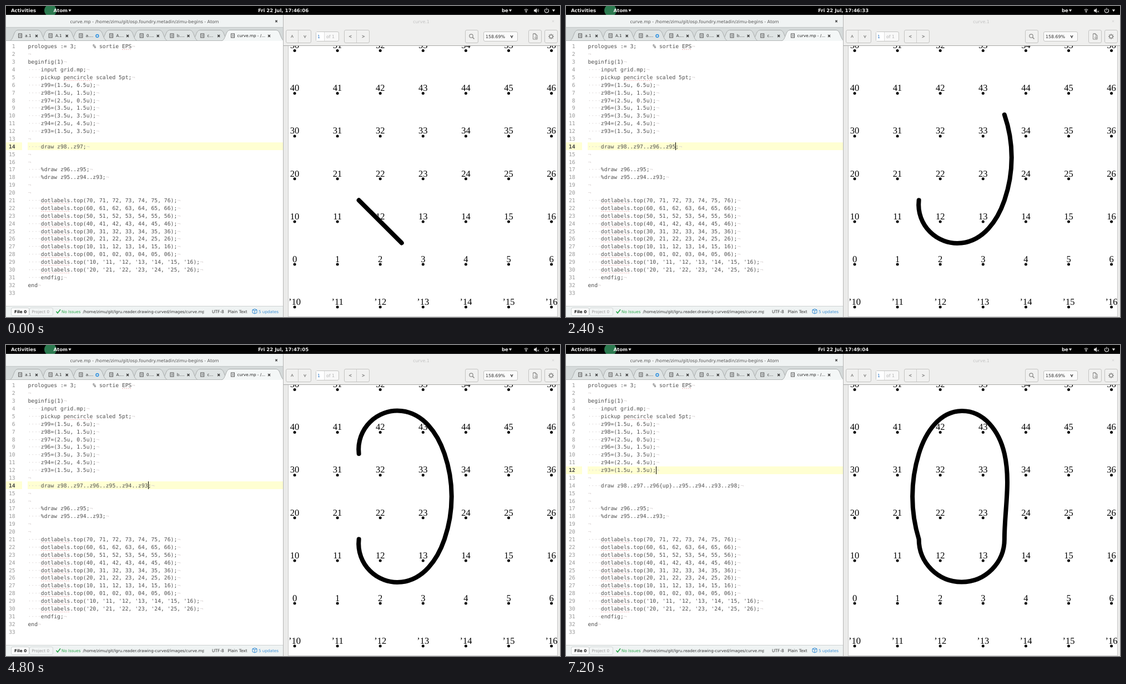
An HTML page with a canvas for the animation above (8 s loop, 998x561 px).

```html
<!DOCTYPE html>
<html lang="en">
<head>
<meta charset="utf-8">
<title>Curve editing</title>
<style>
  html, body { margin: 0; width: 100%; height: 100%; overflow: hidden; background: #fff; }
  canvas { display: block; width: 998px; height: 561px; }
</style>
</head>
<body>
<canvas id="stage" width="998" height="561"></canvas>
<script>
const ctx = document.getElementById('stage').getContext('2d');
ctx.textRendering = 'geometricPrecision';

const LOOP = 8000, STEP = 1200;
const SANS = '"DejaVu Sans", sans-serif', MONO = '"DejaVu Sans Mono", monospace';
const CODE_X = 39.5, CHAR = 5.848, LINE = 13.88, CODE_SIZE = 9.713;
const UNIT = 77.1, ORIGIN = [520, 466];
const UP = Math.PI / 2;

const POINTS = {
  98: [1.5, 1.5], 97: [2.5, 0.5], 96: [3.5, 1.5],
  95: [3.5, 3.5], 94: [2.5, 4.5], 93: [1.5, 3.5]
};
const ROUTE = [98, 97, 96, 95, 94, 93, 98];
const CLOCK = ['46:06', '46:19', '46:33', '46:46', '47:05', '47:12', '49:04'];

// ---------- drawing helpers ----------
function rect(x, y, w, h, fill) {
  ctx.fillStyle = fill;
  ctx.fillRect(x, y, w, h);
}

function text(str, x, y, { size = 7.9, color = '#333', family = SANS, weight = '', align = 'left' } = {}) {
  ctx.font = `${weight} ${size}px ${family}`;
  ctx.fillStyle = color;
  ctx.textAlign = align;
  ctx.fillText(str, x, y);
}

function line(points, color, width = 1) {
  ctx.beginPath();
  points.forEach(([x, y]) => ctx.lineTo(x, y));
  ctx.strokeStyle = color;
  ctx.lineWidth = width;
  ctx.stroke();
}

function disc(x, y, r, color) {
  ctx.beginPath();
  ctx.arc(x, y, r, 0, 7);
  ctx.fillStyle = color;
  ctx.fill();
}

function arc(x, y, r, from, to, color, width = 1) {
  ctx.beginPath();
  ctx.arc(x, y, r, from, to);
  ctx.strokeStyle = color;
  ctx.lineWidth = width;
  ctx.stroke();
}

function button(x, y, w, h, fill = '#f1f1f0', edge = '#c4c4c2') {
  ctx.beginPath();
  ctx.roundRect(x + .5, y + .5, w - 1, h - 1, 2.5);
  ctx.fillStyle = fill;
  ctx.fill();
  ctx.strokeStyle = edge;
  ctx.lineWidth = 1;
  ctx.stroke();
}

function cross(x, y, r, color, width = 1.3) {
  line([[x - r, y - r], [x + r, y + r]], color, width);
  line([[x + r, y - r], [x - r, y + r]], color, width);
}

function chevron(x, y, dx, dy, color, width = 1.2) {
  line([[x - dx - dy, y - dy - dx], [x + dx, y + dy], [x - dx + dy, y - dy + dx]], color, width);
}

function triangle(x, y, color) {
  ctx.beginPath();
  ctx.moveTo(x - 2.7, y - 1.8);
  ctx.lineTo(x + 2.7, y - 1.8);
  ctx.lineTo(x, y + 2.4);
  ctx.fillStyle = color;
  ctx.fill();
}

function clipped(x, y, w, h, draw) {
  ctx.save();
  ctx.beginPath();
  ctx.rect(x, y, w, h);
  ctx.clip();
  draw();
  ctx.restore();
}

// ---------- Hobby splines, as drawn by MetaPost ----------
function velocity(a, b) {
  const { sin, cos, sqrt } = Math;
  const top = 2 + Math.SQRT2 * (sin(a) - sin(b) / 16) * (sin(b) - sin(a) / 16) * (cos(a) - cos(b));
  return top / (3 + 1.5 * (sqrt(5) - 1) * cos(a) + 1.5 * (3 - sqrt(5)) * cos(b));
}

function hobby(pts, startDir, endDir) {
  const n = pts.length - 1;
  const dist = [], chord = [], turn = Array(n + 1).fill(0), theta = Array(n + 1).fill(0);
  for (let k = 0; k < n; k++) {
    const dx = pts[k + 1][0] - pts[k][0], dy = pts[k + 1][1] - pts[k][1];
    dist[k] = Math.hypot(dx, dy);
    chord[k] = Math.atan2(dy, dx);
    if (k) {
      const d = chord[k] - chord[k - 1];
      turn[k] = Math.atan2(Math.sin(d), Math.cos(d));
    }
  }
  for (let pass = 0; pass < 80; pass++) {
    theta[0] = startDir === undefined ? -theta[1] - turn[1] : startDir - chord[0];
    for (let k = 1; k < n; k++) {
      const a = 1 / dist[k - 1], d = 1 / dist[k];
      theta[k] = -(2 * a * turn[k] + d * turn[k + 1] + a * theta[k - 1] + d * theta[k + 1]) / (2 * (a + d));
    }
    theta[n] = endDir === undefined ? -theta[n - 1] : endDir - chord[n - 1];
  }
  return dist.map((d, k) => {
    const t = theta[k], f = -turn[k + 1] - theta[k + 1];
    const r = d * velocity(t, f), s = d * velocity(f, t);
    const [x0, y0] = pts[k], [x1, y1] = pts[k + 1];
    return [
      [x0, y0],
      [x0 + r * Math.cos(chord[k] + t), y0 + r * Math.sin(chord[k] + t)],
      [x1 - s * Math.cos(chord[k] - f), y1 - s * Math.sin(chord[k] - f)],
      [x1, y1]
    ];
  });
}

const toStage = ([x, y]) => [ORIGIN[0] + x * UNIT, ORIGIN[1] - y * UNIT];

function curveFor(step) {
  const pts = ROUTE.map(id => POINTS[id]);
  return step < 6
    ? hobby(pts.slice(0, step + 2))
    : [...hobby(pts.slice(0, 3), undefined, UP), ...hobby(pts.slice(2), UP)];
}
const CURVES = CLOCK.map((_, step) => curveFor(step));

// ---------- source text ----------
function drawCommand(step) {
  const names = ROUTE.slice(0, step + 2).map(id => 'z' + id);
  if (step === 6) {
    names.length = ROUTE.length;
    names[2] += '{up}';
  }
  return `    draw ${names.join('..')};`;
}

function codeLines(step) {
  const labels = ['7', '6', '5', '4', '3', '2', '1', '0', "'1", "'2"].map(row =>
    `    dotlabels.top(${[0, 1, 2, 3, 4, 5, 6].map(c => row + c).join(', ')});`);
  const coords = ['6.5', '1.5', '0.5', '1.5', '3.5', '4.5', '3.5'];
  const xs = ['1.5', '1.5', '2.5', '3.5', '3.5', '2.5', '1.5'];
  return [
    'prologues := 3;     % sortie EPS', '', 'beginfig(1)',
    '    input grid.mp;', '    pickup pencircle scaled 5pt;',
    ...xs.map((x, i) => `    z${99 - i}=(${x}u, ${coords[i]}u);`),
    '', drawCommand(step), '', '',
    '    %draw z96..z95;', '    %draw z95..z94..z93;', '', '',
    ...labels, '    endfig;', 'end', ''
  ];
}

// ---------- scene parts ----------
function topBar(step) {
  const bold = { size: 8.55, color: '#eee', weight: 'bold' };
  rect(0, 0, 998, 16, '#000');
  text('Activities', 9, 11, bold);
  clipped(0, 0, 200, 16, () => disc(80, 8, 11, '#2c7a50'));
  text('Atom', 85.5, 11, bold);
  triangle(115, 8, '#ddd');
  text(`Fri 22 Jul, 17:${CLOCK[step]}`, 499.5, 11, { ...bold, align: 'center' });
  text('be', 893, 11, bold);
  triangle(908.5, 8, '#ddd');

  for (const r of [2.2, 4.4]) arc(937, 11, r + .6, -2.3, -.85, '#bbb', 1.2);
  disc(937, 10.6, 1.1, '#eee');
  ctx.beginPath();
  [[951, 6.5], [953, 6.5], [956, 4], [956, 12.5], [953, 10], [951, 10]].forEach(p => ctx.lineTo(...p));
  ctx.fillStyle = '#ddd';
  ctx.fill();
  if (step === 0) for (const r of [2, 4]) arc(955.5, 8.2, r, -.9, .9, '#ccc');
  else cross(958.5, 10, 1.5, '#ddd', 1);
  arc(974, 8.5, 3.6, -1, 4.14, '#ddd', 1.2);
  line([[974, 3.5], [974, 8]], '#ddd', 1.2);
  triangle(986.5, 8, '#ddd');
}

function fileIcon(x, y) {
  ctx.strokeStyle = '#555';
  ctx.lineWidth = 1;
  ctx.strokeRect(x + .5, y + .5, 6, 7);
  for (const dy of [2.5, 4, 5.5]) line([[x + 2, y + dy], [x + 5.5, y + dy]], '#777', .7);
}

function tab(x, w, fill) {
  ctx.beginPath();
  ctx.moveTo(x - 6, 63);
  ctx.bezierCurveTo(x + 2, 62, x + 1, 44, x + 9, 43.5);
  ctx.lineTo(x + w - 9, 43.5);
  ctx.bezierCurveTo(x + w - 1, 44, x + w - 2, 62, x + w + 6, 63);
  ctx.fillStyle = fill;
  ctx.fill();
  ctx.strokeStyle = '#a9adad';
  ctx.lineWidth = 1;
  ctx.stroke();
}

function editorChrome() {
  rect(0, 16, 499, 23, '#f0f3f3');
  text('curve.mp - /home/zimu/git/osp.foundry.metadin/zimu-begins - Atom', 249.5, 31,
    { color: '#555', align: 'center' });
  cross(487, 27.5, 1.7, '#444');
  rect(0, 38, 499, 25, '#d5dada');
  rect(0, 38, 499, 1, '#c3c8c8');

  const tabs = ['a.1', 'A.1', 'a....', 'A....', '0....', 'b....', 'c...'];
  for (let i = tabs.length - 1; i >= 0; i--) {
    const x = 12 + i * 54.7;
    tab(x, 55, '#dfe4e4');
    fileIcon(x + 10, 49.5);
    text(tabs[i], x + 22.3, 56.3, { size: 7.2 });
    if (i === 2) arc(x + 43, 54, 2.4, 0, 7, '#2a8fe0', 1.5);
    else cross(x + 43, 54, 2, '#333');
  }
  rect(0, 62, 499, 1, '#b4b8b8');
  tab(394, 102, '#f4f7f7');
  fileIcon(405, 49.5);
  text('curve.mp - /...', 416.5, 56.3, { size: 7.2, color: '#222' });
  cross(474, 54, 2, '#333');
}

function spelling(row, col, length) {
  const y = Math.round(76.4 + row * LINE) + 2.5, x = CODE_X + col * CHAR;
  ctx.setLineDash([2, 1.5]);
  line([[x, y], [x + length * CHAR, y]], '#f2b5b5');
  ctx.setLineDash([]);
}

function editor(step) {
  const active = step === 6 ? 11 : 13;
  const lines = codeLines(step);
  const code = { size: CODE_SIZE, family: MONO, color: '#505050' };
  const faint = { ...code, color: '#d9d3d3' };
  rect(0, 63, 499, 478, '#fff');
  const bandY = Math.round(66 + active * LINE);
  rect(0, bandY, 29, 14, '#ffffd2');
  rect(39, bandY, 460, 14, '#ffffd2');

  lines.forEach((str, row) => {
    const y = 76.4 + row * LINE, on = row === active;
    text(row + 1, 16.7, y, { ...code, align: 'right', color: on ? '#444' : '#999', weight: on ? 'bold' : '' });
    text(str, CODE_X, y, code);
    if (str.startsWith(' ')) text('····', CODE_X, y, faint);
    if (row < lines.length - 1) text('¬', CODE_X + str.length * CHAR, y, faint);
    if (str.includes('dotlabels')) spelling(row, 4, 9);
  });
  spelling(0, 29, 3);
  spelling(4, 11, 9);

  if (step > 1) {
    const col = lines[active].length - (step === 6 ? 0 : 1);
    rect(Math.round(CODE_X + col * CHAR), bandY, 1, 14, '#000');
  }
}

function statusBar() {
  const small = { size: 7.2, color: '#333' };
  const y = 553.5;
  rect(0, 541, 499, 20, '#eff3f3');
  rect(0, 541, 499, 1, '#cfd3d3');
  button(9, 544, 33, 15, '#fbfcfc', '#cfd3d3');
  button(42, 544, 43, 15, '#f2f5f5', '#d5d9d9');
  text('File 0', 15, y, { ...small, color: '#111', weight: 'bold' });
  text('Project 0', 46.5, y, { ...small, color: '#999' });
  line([[90.5, 551], [93, 554], [98, 547.5]], '#2aa84a', 1.7);
  text('No Issues', 100, y, { ...small, color: '#2aa84a' });
  clipped(138, 541, 219, 20, () =>
    text('/home/zimu/git/lgru.reader.drawing-curved/images/curve.mp', 138.5, y, small));
  text('UTF-8', 371, y, { ...small, size: 7.5 });
  text('Plain Text', 399.5, y, { ...small, size: 7.4 });
  const blue = '#3b8fd6';
  line([[444, 548], [448, 546.5], [452, 548], [452, 553.5], [448, 555], [444, 553.5], [444, 548], [448, 549.5], [452, 548]], blue);
  line([[448, 549.5], [448, 555]], blue);
  text('5 updates', 455, y, { ...small, color: blue });
}

function viewerChrome() {
  rect(499, 16, 499, 56, '#efefee');
  rect(499, 16, 1, 545, '#b5b5b5');
  text('curve.1', 748, 31, { color: '#c2c2c2', align: 'center' });
  cross(985.5, 27.5, 1.6, '#d0d0d0', 1);

  const ink = '#8a8a88';
  for (const x of [504, 609]) {
    button(x, 43, 46, 24);
    line([[x + 22.5, 44], [x + 22.5, 66]], '#cfcfcd');
  }
  chevron(515.5, 55, 0, -2, ink);
  chevron(538.5, 55, 0, 2, ink);
  chevron(620.5, 55, -2, 0, ink);
  chevron(643.5, 55, 2, 0, ink);

  button(558, 46, 42, 18, '#f8f8f8');
  rect(559, 47, 14, 16, '#fff');
  line([[573.5, 47], [573.5, 63]], '#dcdcdc');
  text('1', 561, 58, { color: '#2a76c6' });
  text('of 1', 577, 58, { color: '#b5b5b5' });

  button(827, 43, 24, 24);
  arc(838, 54, 3.2, 0, 7, ink, 1.2);
  line([[840.3, 56.3], [843.5, 59.5]], ink, 1.6);
  button(860, 46, 62, 18, '#fafafa');
  text('158.69%', 864, 58);
  chevron(911, 55, 0, 2, '#444', 1.4);

  button(941, 43, 24, 24);
  line([[950, 50], [954, 50], [957, 53], [957, 60], [949.5, 60], [949.5, 50], [954, 50], [954, 53], [957, 53]], ink);
  arc(954.5, 57, 1.6, 0, 7, ink);
  button(970, 43, 24, 24);
  arc(982, 55, 2.9, 0, 7, ink, 1.4);
  for (let a = 0; a < 8; a++) {
    const c = Math.cos(a * Math.PI / 4), s = Math.sin(a * Math.PI / 4);
    line([[982 + 3 * c, 55 + 3 * s], [982 + 5 * c, 55 + 5 * s]], ink, 1.3);
  }
}

function page(step) {
  rect(500, 72, 498, 489, '#ebebea');
  rect(508, 72, 486, 489, '#c9c9c8');
  rect(509, 72, 484, 488, '#fff');
  for (let row = -1; row <= 5; row++) {
    for (let col = 0; col <= 6; col++) {
      const [x, y] = toStage([col, row]);
      const label = row < 0 ? '’1' + col : row * 10 + col;
      disc(x, y, 2.5, '#000');
      text(label, x, y - 4.3, { size: 16.5, color: '#000', family: '"Liberation Serif", serif', align: 'center' });
    }
  }
  ctx.beginPath();
  CURVES[step].forEach((segment, i) => {
    const [a, b, c, d] = segment.map(toStage);
    if (i === 0) ctx.moveTo(...a);
    ctx.bezierCurveTo(...b, ...c, ...d);
  });
  ctx.strokeStyle = '#000';
  ctx.lineWidth = 8;
  ctx.lineCap = ctx.lineJoin = 'round';
  ctx.stroke();
  ctx.lineCap = 'butt';
  ctx.lineJoin = 'miter';
}

function render(step) {
  clipped(500, 72, 498, 489, () => page(step));
  viewerChrome();
  rect(500, 71, 498, 1, '#a8a8a6');
  clipped(0, 16, 499, 545, () => {
    editorChrome();
    editor(step);
    statusBar();
  });
  topBar(step);
}

let start;
function tick(now) {
  start ??= now;
  render(Math.min(6, Math.floor(((now - start) % LOOP) / STEP)));
  requestAnimationFrame(tick);
}
render(0);
requestAnimationFrame(tick);
</script>
</body>
</html>
```
